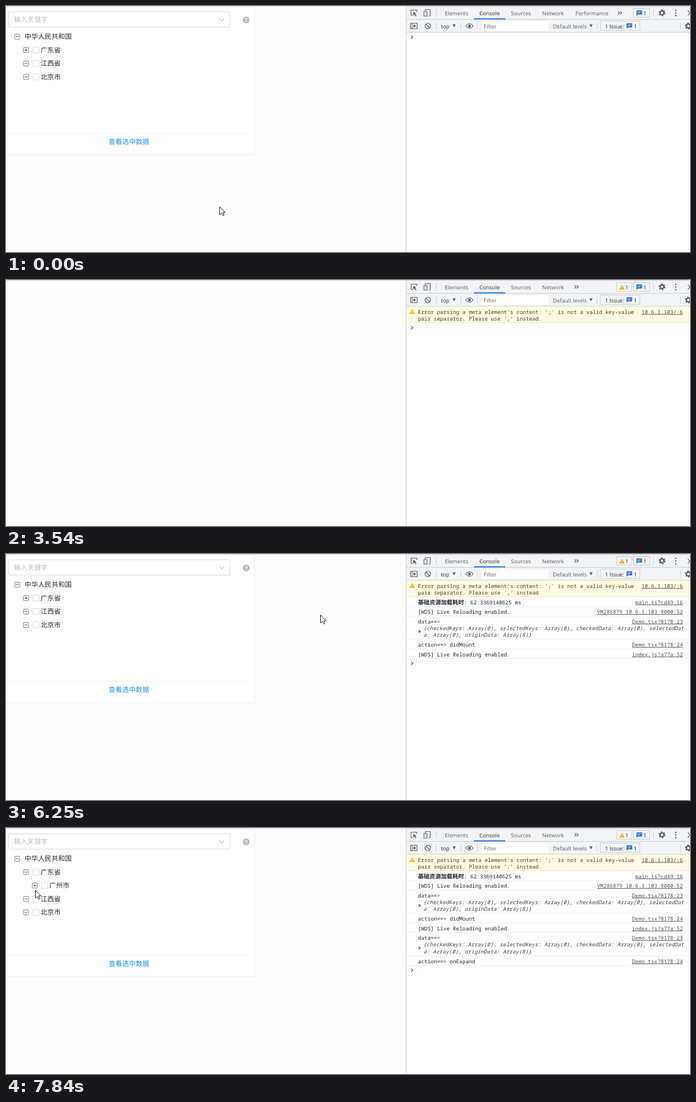
Write an HTML page that moves like this. It is 1247x449 px and loops after 8000 ms.

```html
<!DOCTYPE html>
<html lang="zh">
<head>
<meta charset="utf-8">
<title>Tree select and console</title>
<style>
html, body { margin: 0; width: 100%; height: 100%; overflow: hidden; background: #fefefe; }
svg { display: block; }
text { white-space: pre; text-rendering: geometricPrecision; }
.page { font: 12.3px "Noto Sans CJK SC", "Noto Sans CJK", sans-serif; fill: #262626; }
.tools { font: 9.95px "Open Sans", sans-serif; fill: #5f6368; }
.tools .dark { fill: #333; }
.log { font: 9.667px "Noto Sans Mono", monospace; fill: #262626; }
.src { text-anchor: end; text-decoration: underline; fill: #545454; }
.warn { fill: #5c3c00; }
.obj { font-style: italic; fill: #444; }
.cjk { font: 700 10.5px "Noto Sans CJK SC", "Noto Sans CJK", sans-serif; }
.line { fill: none; stroke: #5f6368; stroke-width: 1.2; }
.sep { stroke: #cacdd1; }
.row { stroke: #efefef; }
.button { fill: #f1f3f4; stroke: #cacdd1; }
</style>
</head>
<body>
<svg width="1247" height="449" viewBox="0 0 1247 449">
  <defs>
    <g id="minus"><rect x="-4.5" y="-4.5" width="9" height="9" rx=".8" fill="#fff" stroke="#777"/><path d="M-2.5 0h5" stroke="#444"/></g>
    <g id="plus"><use href="#minus"/><path d="M0-2.5v5" stroke="#444"/></g>
    <rect id="box" x="-5.5" y="-5.5" width="11" height="11" rx="1" fill="#fff" stroke="#d9d9d9"/>
    <path id="bubble" d="M0 0H10V7.5H2.5L0 10ZM2 2.2v1H8v-1ZM2 4.6v1H6v-1Z" fill="#1a73e8" fill-rule="evenodd"/>
    <g id="alert"><path d="M5 0 10 9H0Z" fill="#f4b400"/><path d="M5 3v3M5 7v1" stroke="#fff" stroke-width="1.1"/></g>
    <g id="gear" fill="none" stroke="#5f6368"><circle r="3.5" stroke-width="2.4"/><circle r="5.2" stroke-width="2" stroke-dasharray="2.7 2.745"/></g>
    <path id="more" d="m0 0 3 3-3 3m4-6 3 3-3 3" class="line"/>
    <path id="down" d="M0 0h6l-3 5.5Z" fill="#5f6368"/>
    <g id="data">
      <text x="751" y="126.5">data==></text><text x="1234" y="126.5" class="src">Demo.tsx?8178:23</text>
      <path d="M752.5 138.5v6l4.5-3Z" fill="#6e6e6e"/>
      <text x="761" y="138.7" class="obj">{checkedKeys: Array(0), selectedKeys: Array(0), checkedData: Array(0), selectedDat</text>
      <text x="761" y="151" class="obj">a: Array(0), originData: Array(8)}</text>
      <path class="row" d="M730 155.5h517M730 173.5h517"/>
      <text x="1234" y="169" class="src">Demo.tsx?8178:24</text>
    </g>
    <path id="arrow" d="M.5.5V15L4 11.8 6.3 16.8 8.6 15.8 6.4 11H10.5Z" fill="#fff" stroke="#111"/>
    <path id="beam" d="M0 .5h2.2l.8.8.8-.8H6M3 1v14M0 15.5h2.2l.8-.8.8.8H6" fill="none" stroke="#111"/>
    <g id="hand" stroke="#111" stroke-linejoin="round">
      <path fill="#fff" d="M5 14V2Q5 .6 6.3.6T7.6 2V8.6Q8.8 7.6 10 9 11.5 8 12.4 9.6 14.3 9 14.4 11V15Q14.4 17 13 19V21.5H5.6V19.6Q3 16.5 1 13.2.2 11.6 1.6 11.2 3 11 5 14Z"/>
      <path fill="none" d="M7.6 8.6V12M10 9v3M12.4 9.6v3"/>
    </g>
  </defs>

  <!-- Page with the tree -->
  <path d="M0 .5H729" stroke="#d4d6d9"/>
  <g class="page" data-on="0 3540 4530">
    <path d="M0 2.5H453.5V271.5H0" fill="#fff" stroke="#ebebeb"/>
    <g id="frame">
      <rect x="4.5" y="10.5" width="403.5" height="28" rx="2" fill="#fff" stroke="#d9d9d9"/>
      <path d="M4 232.5H444.5" stroke="#f0f0f0"/>
    </g>
    <g id="content">
      <text x="14.5" y="29.3" fill="#bfbfbf">输入关键字</text>
      <path d="m389 22.5 4.5 5 4.5-5" fill="none" stroke="#bfbfbf" stroke-width="1.1"/>
      <circle cx="438" cy="25.5" r="6.2" fill="#bfbfbf"/>
      <text x="438" y="29" text-anchor="middle" style="font:700 9px Open Sans,sans-serif;fill:#fff">?</text>
      <use href="#minus" x="20.5" y="56"/><text x="33.7" y="60">中华人民共和国</text>
      <g data-on="0 7330"><use href="#plus" x="36.5" y="80.5"/></g>
      <g data-on="7330"><use href="#minus" x="36.5" y="80.5"/></g>
      <use href="#box" x="54.5" y="80.5"/><text x="63" y="84.5">广东省</text>
      <svg id="child" y="92.5" width="200" height="0">
        <use href="#plus" x="52.5" y="12.5"/><use href="#box" x="70.5" y="12.5"/><text x="79" y="16.5">广州市</text>
      </svg>
      <g id="rest">
        <use href="#minus" x="36.5" y="105"/><use href="#box" x="54.5" y="105"/><text x="63" y="109">江西省</text>
        <use href="#minus" x="36.5" y="129.5"/><use href="#box" x="54.5" y="129.5"/><text x="63" y="133.5">北京市</text>
      </g>
      <text x="187.3" y="252" fill="#1890ff">查看选中数据</text>
    </g>
  </g>

  <!-- Developer tools bars -->
  <rect x="730" width="517" height="449" fill="#fff"/>
  <rect x="730" width="517" height="48" fill="#f1f3f4"/>
  <path class="sep" d="M729.5 0V449M730 .5h517M730 24.5h517M730 48h517M784.5 6v13M1180.5 6v13M784.5 30v13M829.5 30v13M859.5 30v13M1229.5 30v13"/>
  <g class="tools">
    <path class="line" d="M742 17h-3.5V7.5h10.5V11"/><path d="M742.5 10.5v7l2-1.8 2.7 3.3 1.3-1-2.7-3.2h2.7Z"/>
    <path class="line" d="M764.5 9V6.5h9V18h-3M762 10h5.5v8.5H762Z"/>
    <text x="800" y="16.5">Elements</text><text x="863" y="16.5" class="dark">Console</text>
    <text x="920.5" y="16.5">Sources</text><text x="977.5" y="16.5">Network</text>
    <path d="M853 23.5h57" stroke="#1a73e8" stroke-width="2"/>
    <use href="#gear" x="1196" y="12.5"/><use href="#gear" x="1244" y="36.5"/>
    <circle cx="1221" cy="8" r="1.3"/><circle cx="1221" cy="12.8" r="1.3"/><circle cx="1221" cy="17.6" r="1.3"/>
    <path class="line" d="m1243 9 8 8m0-8-8 8"/>
    <path class="line" d="M737.5 31.5h12v10h-12ZM740.5 31.5v10"/><path d="M743 33.5v6l4.5-3Z"/>
    <circle class="line" cx="769" cy="36.5" r="5"/><path class="line" d="m765.5 33 7 7"/>
    <text x="793" y="40.5" class="dark">top</text><use href="#down" x="814" y="33.5"/>
    <path class="line" d="M838 36.5Q844.8 28 851.6 36.5 844.8 45 838 36.5Z"/><circle cx="844.8" cy="36.5" r="2.6"/>
    <g data-on="0 2740">
      <text x="1038" y="16.5">Performance</text><use href="#more" x="1115.5" y="9.5"/>
    </g>
    <g data-on="0 2370 2740">
      <rect class="button" x="1143.5" y="4.5" width="30" height="16"/>
      <use href="#bubble" x="1149.5" y="8"/><text x="1162" y="16.5" class="dark">1</text>
      <path d="M867 28h122v17.5H867Z" fill="#fff"/>
      <text x="997" y="40.5">Default levels</text><use href="#down" x="1063.5" y="33.5"/>
      <path class="sep" d="M1077.5 30v13"/>
      <rect class="button" x="1083.5" y="27.5" width="72" height="17"/>
      <text x="1092" y="40.5" class="dark">1 Issue:</text><use href="#bubble" x="1131.5" y="31.5"/><text x="1144.5" y="40.5" class="dark">1</text>
    </g>
    <g data-on="2370 2740">
      <rect class="button" x="1146.5" y="4.5" width="27" height="16"/>
      <use href="#alert" x="1151" y="8.5"/><text x="1162" y="16.5" class="dark">1</text>
      <path d="M867 28h125v17.5H867Z" fill="#fff"/>
      <text x="1000" y="40.5">Default levels</text><use href="#down" x="1066" y="33.5"/>
      <path class="sep" d="M1080.5 30v13"/>
      <rect class="button" x="1085.5" y="27.5" width="59" height="17"/>
      <text x="1094" y="40.5" class="dark">No Issues</text>
    </g>
    <g data-on="2740">
      <use href="#more" x="1036.5" y="9.5"/>
      <rect class="button" x="1113.5" y="4.5" width="27" height="16"/>
      <use href="#alert" x="1118" y="8.5"/><text x="1129" y="16.5" class="dark">1</text>
    </g>
    <text x="871" y="40.5">Filter</text>
  </g>

  <!-- Console messages -->
  <g class="log">
    <g data-on="2370">
      <path d="M730 48.5h517V78H730Z" fill="#fffbe5"/><path d="M730 78h517M730 48.5h517" stroke="#f7edbd"/>
      <use href="#alert" x="735.5" y="53"/>
      <text x="751" y="61.5" class="warn">Error parsing a meta element's content: ';' is not a valid key-value</text>
      <text x="751" y="74" class="warn">pair separator. Please use ',' instead.</text>
      <text x="1234" y="61.5" class="src">10.6.1.103/:6</text>
    </g>
    <g data-on="4410">
      <text x="751" y="91.5"><tspan class="cjk">基础资源加载耗时</tspan>: 62.3369140625 ms</text>
      <text x="1234" y="91.5" class="src">main.ts?cd49:16</text>
      <text x="751" y="109">[WDS] Live Reloading enabled.</text>
      <path class="row" d="M730 96.5h517M730 113.5h517"/>
    </g>
    <text x="1234" y="109" class="src" data-on="4410 4830">VM286879:52</text>
    <text x="1234" y="109" class="src" data-on="4830">VM286879 10.6.1.103:8000:52</text>
    <g data-on="5510">
      <use href="#data"/><text x="751" y="169">action==> didMount</text>
      <text x="751" y="186.5">[WDS] Live Reloading enabled.</text><text x="1234" y="186.5" class="src">index.js?a77a:52</text>
      <path class="row" d="M730 190.5h517"/>
    </g>
    <g data-on="7600">
      <use href="#data" y="77.5"/><text x="751" y="246.5">action==> onExpand</text>
    </g>
    <path id="prompt" d="m738.5-3 3.2 3-3.2 3" fill="none" stroke="#1a73e8" stroke-width="1.5"/>
  </g>

  <use id="cursor"/>
</svg>
<script>
const LOOP = 8000;
const $ = id => document.getElementById(id);
const timed = [...document.querySelectorAll('[data-on]')]
  .map(el => ({ el, marks: el.dataset.on.split(' ').map(Number) }));

// Each entry: start time, then the values that hold from there on.
const promptY = [[0, 57], [2370, 87], [4410, 122], [5510, 199.5], [7600, 259.5]];
const fade = [[0, 1, 1], [4530, .5, .5], [4680, 1, .8], [4830, 1, 1]];
const expand = [[0, 0], [7330, 13], [7450, 24.5]];
const pointer = [
  [0, 'arrow', 389, 366], [500, ''], [6250, 'arrow', 573, 111], [6370, 'beam', 176, 20],
  [6520, 'hand', 68, 62], [6670, 'hand', 57, 76], [6790, 'hand', 46, 81], [6940, 'hand', 37, 81],
  [7060, 'hand', 32, 81], [7450, 'hand', 46, 98], [7600, 'hand', 47, 101], [7720, 'arrow', 52, 110],
  [7840, 'arrow', 53, 113]
];
const at = (steps, t) => steps.findLast(step => step[0] <= t).slice(1);

function draw(t) {
  // An element is shown after an odd number of its marks has passed.
  for (const { el, marks } of timed)
    el.style.display = marks.filter(m => m <= t).length % 2 ? '' : 'none';

  $('prompt').setAttribute('transform', `translate(0 ${at(promptY, t)})`);
  [$('frame').style.opacity, $('content').style.opacity] = at(fade, t);

  const [height] = at(expand, t);
  $('child').setAttribute('height', height);
  $('rest').setAttribute('transform', `translate(0 ${height})`);

  const [shape, x = 0, y = 0] = at(pointer, t);
  const cursor = $('cursor');
  cursor.style.display = shape ? '' : 'none';
  cursor.setAttribute('href', '#' + shape);
  cursor.setAttribute('transform', `translate(${x} ${y})`);
}

function tick() {
  draw(performance.now() % LOOP);
  requestAnimationFrame(tick);
}
tick();
</script>
</body>
</html>
```
